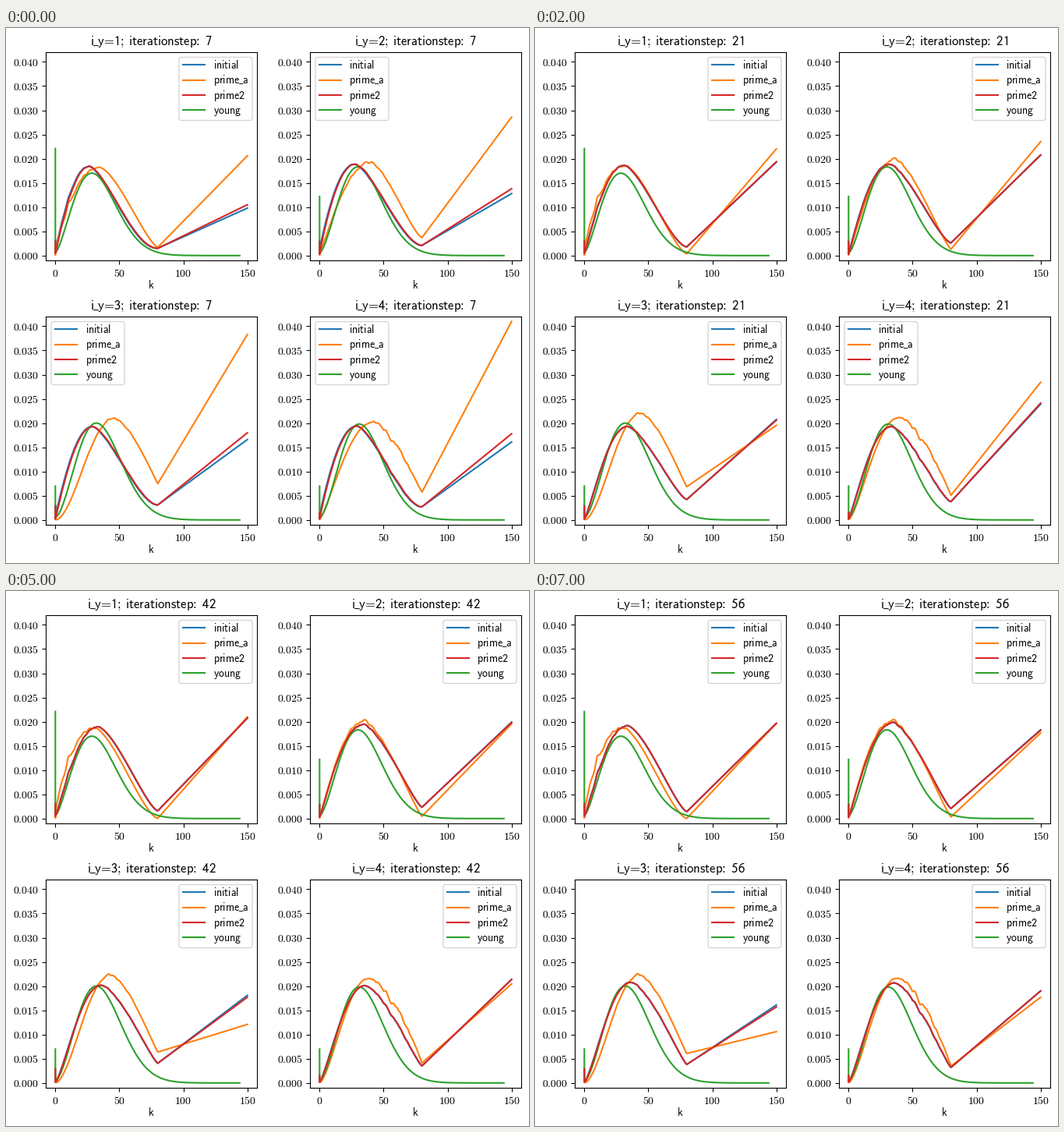
Animation, 671 px wide and 686 px high, one loop 8000 ms. Source, as a matplotlib script:

```python
import numpy as np
import matplotlib.pyplot as plt
from matplotlib.animation import FuncAnimation
from matplotlib.patches import FancyBboxPatch
from matplotlib.lines import Line2D
from matplotlib.transforms import Affine2D

W, H = 671, 686
AX_W, AX_H = 271, 267
STEPS = 8
LOW_K, END_K = 80, 150      # end of the fine grid, last point
BLUE, ORANGE, GREEN, RED = "C0", "C1", "C2", "C3"

plt.rcParams["mathtext.fontset"] = "cm"
fig = plt.figure(figsize=(W / 100, H / 100), dpi=100)
PX = Affine2D().scale(1 / W, -1 / H).translate(0, 1) + fig.transFigure
GRID = np.arange(1, LOW_K + 1)
YOUNG_GRID = np.arange(1, 145)

# Heights are in units of 1e-4. "peak", "rise" and "fall" are (first, last);
# "top", "low" and "end" are the arguments of trend().
PANELS = [
    dict(young=(28.5, 170, 1.35), spike=221, foot=(5, 30), rough=(12, 6), left_until=0,
         gap=(-7, 0),
         prime2=dict(peak=(27, 34.5), rise=(.9, 1), fall=(2, 1.35),
                     top=(184, 0, 1, 1.1), low=(15, 5.5, 1, -.9), end=(105, 150, .6, -8)),
         prime_a=dict(peak=(35, 31), rise=(.73, .64), fall=(1.4, 1.55),
                      top=(182, 5, .5, 0), low=(17, -17, .75, 0), end=(206, 48, .5, -8))),
    dict(young=(30, 183, 1.47), spike=122, foot=(3, 29), rough=(32, 4), left_until=1,
         gap=(-11, 1),
         prime2=dict(peak=(28, 35), rise=(.86, 1.03), fall=(1.75, 1.22),
                     top=(189, -4, 2, 1.9), low=(21, 9, 1, -1.3), end=(138, 104, .9, -8.5)),
         prime_a=dict(peak=(40, 34), rise=(1, 1), fall=(1.4, 1.17),
                      top=(193, 10, .5, 0), low=(37, -34, .6, 0), end=(286, -55, .5, -8))),
    dict(young=(32, 200, 1.6), spike=70, foot=(2, 29), rough=(42, 3), left_until=1,
         gap=(-18, 4),
         prime2=dict(peak=(29.5, 37), rise=(.95, 1.3), fall=(1.75, 1.15),
                     top=(193, -6, 2, 3.1), low=(31, 16, 1, -1.25), end=(180, 47, 1.9, -10)),
         prime_a=dict(peak=(46, 43), rise=(1.85, 1.7), fall=(1.05, 1.09),
                      top=(211, 14, .7, 0), low=(75, -4, 1, -1.45), end=(383, -260, .6, -3))),
    dict(young=(31, 198, 1.6), spike=70, foot=(2, 15), rough=(58, 7), left_until=3,
         gap=(-17, 0),
         prime2=dict(peak=(29.5, 36.5), rise=(.9, 1.25), fall=(1.75, 1.1),
                     top=(194, -7, 2, 2.8), low=(27, 16, 1, -1.6), end=(178, 96, 1.2, -12)),
         prime_a=dict(peak=(42, 38), rise=(1.2, 1.5), fall=(1.03, .9),
                      top=(202, 15, .5, 0), low=(57, 0, 1, -3.3), end=(410, -185, .45, -8))),
]


def trend(n, start, lift, rate, drift):
    """Exponential approach by lift plus a steady drift per step."""
    return start + lift * (1 - np.exp(-rate * n)) + drift * n


def ease(n, first, last):
    return trend(n, first, last - first, .45, 0)


def bell(k, peak, power):
    """Power of a Rayleigh curve scaled to height 1 at the peak."""
    u = k / peak
    return (u * np.exp((1 - u * u) / 2)) ** power


def hump(k, n, peak, rise, fall, top, low, end):
    """Rising bell, then a fall to the low point of the grid."""
    peak, rise, fall = (ease(n, *pair) for pair in (peak, rise, fall))
    top, low = trend(n, *top), trend(n, *low)
    t = np.clip((k - peak) / (LOW_K - peak), 0, 1)
    return np.where(k < peak, top * bell(k, peak, rise),
                    low + (top - low) * (1 - t ** 1.5) ** fall)


def sans(text):
    """Sans math text with the spacing of plain text."""
    for digit in range(10):
        text = text.replace(str(digit), r"\mathrm{%s}" % chr(0x1D7E2 + digit))
    swaps = [("_", r"\hspace{-0.1}\_\hspace{-0.1}"),
             ("=", r"\hspace{-0.2}=\hspace{-0.2}"),
             ("; ", r";\hspace{0.22}"), (": ", r"\hspace{-0.2}:\hspace{0.3}")]
    for old, new in swaps:
        text = text.replace(old, new)
    return r"$\mathsf{%s}$" % text


def label(x, y, text, size=10, ha="left"):
    return fig.text(x, y, sans(text), size=size, ha=ha, va="baseline", transform=PX)


def legend(x, y):
    box = FancyBboxPatch((x, y), 94, 81, boxstyle="round,pad=0,rounding_size=2.8",
                         fc="white", ec="0.8", lw=1, alpha=.8, transform=PX)
    parts = [fig.add_artist(box)]
    rows = [("initial", BLUE), ("prime_a", ORANGE), ("prime2", RED), ("young", GREEN)]
    for row, (name, color) in enumerate(rows):
        mid = y + 9.7 + 19.36 * row
        line = Line2D([x + 5.3, x + 33.1], [mid, mid], color=color, lw=1.5, transform=PX)
        parts += [fig.add_artist(line), label(x + 43.5, mid + 4.9, name)]
    return parts


class Panel:
    def __init__(self, index, spec):
        self.index, self.spec = index, spec
        x, y = 51 + 339 * (index % 2), 31 + 339 * (index // 2)
        ax = fig.add_axes([x / W, 1 - (y + AX_H) / H, AX_W / W, AX_H / H])
        ax.set(xlim=(-7.5, 157.5), ylim=(-10, 420))
        ticks = np.arange(0, 401, 50)
        ax.set_yticks(ticks, [f"${t / 1e4:.3f}$" for t in ticks])
        ax.set_xticks([0, 50, 100, 150], [f"${t}$" for t in (0, 50, 100, 150)])
        ax.tick_params(axis="y", pad=2.9)
        label(x + AX_W / 2, y + 303, "k", ha="center")
        self.title = label(x + AX_W / 2, y - 9.6, "", 12, "center")
        self.left, self.right = legend(x + 7, y + 6.5), legend(x + 171, y + 6.5)

        peak, top, power = spec["young"]
        young = top * bell(YOUNG_GRID, peak, power) + 6 * np.exp(-YOUNG_GRID / 8)
        ax.plot(np.r_[0, 0, YOUNG_GRID], np.r_[spec["spike"], young[0], young],
                color=GREEN, zorder=2.3)
        self.blue, = ax.plot([], [], color=BLUE, zorder=2.1)
        self.orange, = ax.plot([], [], color=ORANGE, zorder=2.2)
        self.red, = ax.plot([], [], color=RED, zorder=2.4)

        center, size = spec["rough"]
        noise = np.random.default_rng(index + 3).normal(0, size, len(GRID))
        noise = np.convolve(noise, [.25, .5, .25], "same")
        self.rough = noise * np.exp(-((GRID - center) / 18) ** 2)

    def draw(self, n):
        s = self.spec
        ks = np.r_[0, 0, GRID, END_K]
        low, high = s["foot"]
        fade = np.exp(-n)

        rough = self.rough * (.2 + .03 * n)
        end = trend(n, *s["prime2"]["end"])
        red = hump(GRID, n, **s["prime2"]) + rough
        lead = np.minimum(GRID + .2 + .4 * fade, LOW_K)
        blue = hump(lead, n, **s["prime2"]) + rough
        gap, rest = s["gap"]
        self.red.set_data(ks, np.r_[high, low, red, end])
        self.blue.set_data(ks, np.r_[high, low, blue, end + gap * fade + rest])

        orange = hump(GRID, n, **s["prime_a"]) + self.rough * (.7 + .04 * n)
        end = trend(n, *s["prime_a"]["end"])
        self.orange.set_data(ks, np.r_[15, 1, np.maximum(orange, 0), end])

        self.title.set_text(sans(f"i_y={self.index + 1}; iterationstep: {7 * (n + 1)}"))
        on_left = n < s["left_until"]
        for part in self.left:
            part.set_visible(on_left)
        for part in self.right:
            part.set_visible(not on_left)


panels = [Panel(i, spec) for i, spec in enumerate(PANELS)]


def update(n):
    for panel in panels:
        panel.draw(n)
    return []


anim = FuncAnimation(fig, update, frames=STEPS, init_func=lambda: update(0),
                     interval=1000, repeat=True, repeat_delay=0, blit=False)
plt.show()
```
